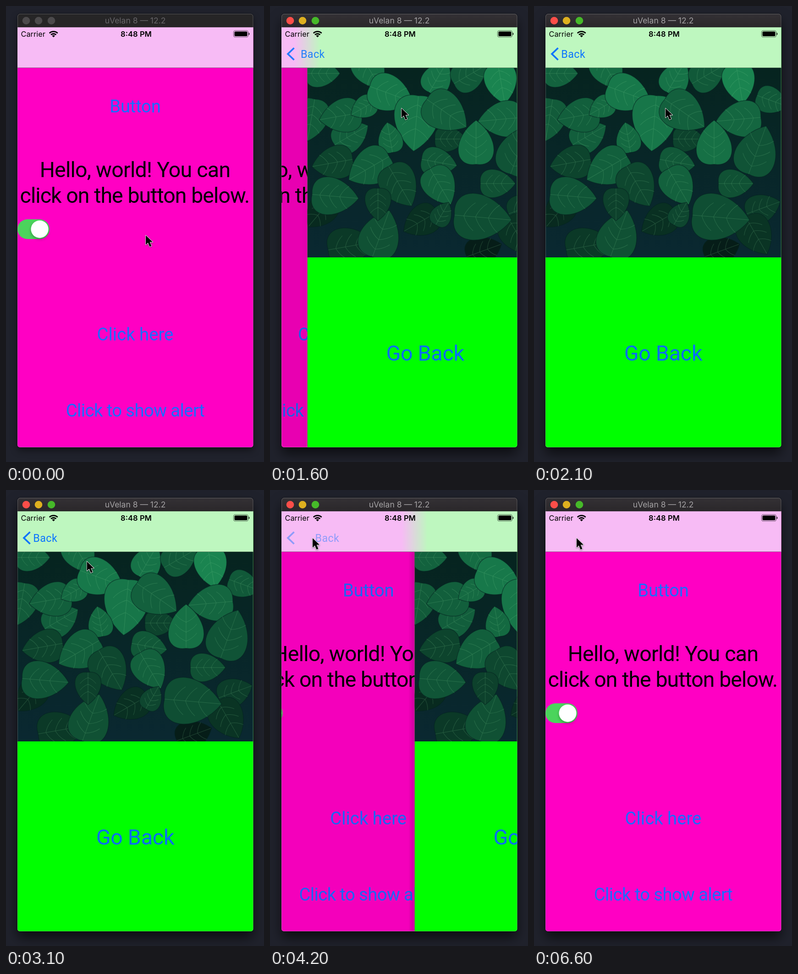
These frames come from a looping animation (563 px wide and 994 px high, 6.7 s). An HTML page:

```html
<!DOCTYPE html>
<html lang="en">
<head>
<meta charset="utf-8">
<title>Navigation demo</title>
<style>
  html, body { margin: 0; width: 100%; height: 100%; overflow: hidden; background: #20222c; }
  #shadow { position: absolute; left: 25px; top: 17px; width: 514px; height: 945px; border-radius: 6px; }
  svg { position: absolute; left: 0; top: 0; display: block; }
  text { font-family: Roboto, "Liberation Sans", sans-serif; }
  .ui { font-family: Inter, "Liberation Sans", sans-serif; font-optical-sizing: none; }
  .mid { text-anchor: middle; }
  .link { fill: #1a6bff; font-size: 38.3px; }
  .hello { font-size: 46.4px; }
</style>
</head>
<body>
<div id="shadow"></div>
<svg width="563" height="994" viewBox="0 0 563 994">
  <defs>
    <clipPath id="frame"><path d="M25 46H539.500V957a5 5 0 0 1-5 5H30a5 5 0 0 1-5-5Z"/></clipPath>
    <clipPath id="photoClip"><rect x="25" y="135" width="515" height="413"/></clipPath>
    <linearGradient id="bar" x2="0" y2="1">
      <stop stop-color="#343135"/><stop offset="1" stop-color="#2a272a"/>
    </linearGradient>
    <linearGradient id="navFill" gradientUnits="userSpaceOnUse" y1="0" y2="0">
      <stop stop-color="#f7bbf5"/><stop offset="1" stop-color="#bef7bf"/>
    </linearGradient>
    <linearGradient id="edgeFill">
      <stop stop-opacity="0"/><stop offset="1" stop-opacity=".5"/>
    </linearGradient>
    <linearGradient id="soil" x2="0" y2="1">
      <stop stop-color="#06241f"/><stop offset="1" stop-color="#0a2831"/>
    </linearGradient>
    <filter id="soft" x="-30%" y="-30%" width="160%" height="160%">
      <feDropShadow dx="0" dy="3" stdDeviation="3" flood-opacity=".3"/>
    </filter>
  </defs>

  <path id="titleBar" d="M25 46V23a6 6 0 0 1 6-6H533.500a6 6 0 0 1 6 6V46Z"/>
  <g id="lights"><circle cx="44" cy="32" r="8.300"/><circle cx="71" cy="32" r="8.300"/><circle cx="99" cy="32" r="8.300"/></g>
  <text id="title" class="ui mid" x="282" y="38.300" font-size="17.500">uVelan 8 — 12.2</text>

  <g clip-path="url(#frame)">
    <g id="home">
      <rect x="25" y="46" width="515" height="916" fill="#ff00c3"/>
      <text id="push" class="mid link" x="282" y="232" letter-spacing="-.2">Button</text>
      <text class="mid hello" x="281.500" y="372.500" letter-spacing="-.7">Hello, world! You can</text>
      <text class="mid hello" x="281" y="429" letter-spacing="-.9">click on the button below.</text>
      <rect x="25" y="465" width="70" height="43" rx="21.500" fill="#4bd45c"/>
      <circle cx="73.500" cy="486.500" r="19" fill="#fff" filter="url(#soft)"/>
      <text class="mid link" x="282" y="729">Click here</text>
      <text class="mid link" x="282" y="895" letter-spacing="-.6">Click to show alert</text>
    </g>
    <rect id="dim" x="25" y="46" width="515" height="916"/>
    <g id="detail">
      <rect id="edge" x="11" y="135" width="14" height="827" fill="url(#edgeFill)"/>
      <rect x="25" y="46" width="515" height="916" fill="#0f0"/>
      <g id="photo" clip-path="url(#photoClip)">
        <rect x="25" y="135" width="515" height="413" fill="url(#soil)"/>
      </g>
      <text class="mid" x="282" y="773" font-size="46.700" letter-spacing="-.3" fill="#0a6cff">Go Back</text>
    </g>

    <rect x="25" y="46" width="515" height="89" fill="url(#navFill)"/>
    <rect x="25" y="134" width="515" height="1" opacity=".4"/>
    <g id="back" fill="#0a74ff">
      <path d="M52.500 91.500L39 104.500L52.500 117.500" fill="none" stroke="#0a74ff" stroke-width="3.800"/>
      <text id="backText" y="112.700" font-size="23.300" letter-spacing=".4">Back</text>
    </g>

    <text class="ui" x="32.500" y="67" font-size="16.300">Carrier</text>
    <g fill="none" stroke="#000" stroke-width="2.900">
      <path d="M94.800 59.300a12.600 12.600 0 0 1 17.800 0M98.100 62.800a8 8 0 0 1 11.200 0"/>
    </g>
    <path d="M103.700 68.300l-3.200-3.400a4.600 4.600 0 0 1 6.400 0Z"/>
    <text class="ui mid" x="284" y="67" font-size="16.600" font-weight="600">8:48 PM</text>
    <rect x="496.500" y="53.500" width="32" height="14.500" rx="4" fill="none" stroke="#000" stroke-opacity=".55" stroke-width="1.200"/>
    <rect x="498.500" y="55.500" width="28" height="10.500" rx="2"/>
    <path d="M530 58.300a3.500 3.500 0 0 1 0 5Z" stroke="#000" stroke-opacity=".5"/>
  </g>
  <path d="M25 46H540" stroke="#111" stroke-opacity=".7"/>
  <rect x="25.500" y="17.500" width="513.500" height="944" rx="5.500" fill="none" stroke="#fff" stroke-opacity=".23"/>

  <path id="pointer" d="M0 0V20.500L4.800 16L8.600 24.800L12.500 23.100L8.700 14.600H15.200Z"
    stroke="#fff" stroke-width="1.600" stroke-linejoin="round" paint-order="stroke"
    style="filter:drop-shadow(0 1px 1.500px #0007)"/>
</svg>

<script>
const LOOP = 6700, WIDTH = 515;
const ACTIVATE = 800, PUSH = 1400, POP = 4100;
const PRESS_PUSH = [1300, 1500], PRESS_BACK = [3900, POP];
// time, x, y of the pointer tip
const POINTER = [[0, 305, 500], [200, 305, 500], [1000, 287, 223], [2500, 287, 223], [3600, 93, 105], [LOOP, 93, 105]];
const LIGHTS = ['#fc4e49', '#deb01f', '#46b929'];

// leaf centre x, y, length, tip angle
const LEAVES = [
  [28, 315, 82, 130], [33, 12, 76, 0], [137, 6, 90, 60], [285, 20, 80, -60], [355, 14, 85, -30],
  [495, 72, 74, 20], [8, 113, 95, 100], [95, 147, 86, -30], [312, 155, 70, 0], [55, 207, 92, 170],
  [475, 305, 80, -20], [95, 388, 105, -10], [385, 398, 82, -20], [247, 335, 86, 150], [460, 365, 95, 60],
  [423, 34, 90, 80], [72, 105, 94, 170], [122, 87, 62, 150], [182, 57, 102, 20], [237, 120, 124, 95],
  [303, 98, 108, 35], [422, 112, 100, 175], [180, 152, 68, -100], [368, 163, 98, -90], [462, 180, 114, -70],
  [287, 206, 80, 10], [135, 218, 104, 150], [290, 258, 92, 60], [202, 257, 102, 60], [415, 252, 78, 0],
  [60, 280, 104, 5], [160, 362, 110, -70], [154, 297, 72, 90], [294, 318, 58, -60], [382, 326, 128, 5]
];

const $ = id => document.getElementById(id);
const set = (id, attrs) => { for (const k in attrs) $(id).setAttribute(k, attrs[k]); };
const within = (t, [a, b]) => t >= a && t < b;

function addPath(parent, attrs) {
  const path = document.createElementNS('http://www.w3.org/2000/svg', 'path');
  for (const k in attrs) path.setAttribute(k, attrs[k]);
  parent.append(path);
}

function drawLeaf([x, y, len, angle], i) {
  const light = 1 - y / 800 + (i % 4 - 1.5) * 0.07 - (i < 15 ? 0.16 : 0);
  const rgb = [24, 124, 68].map((c, k) => Math.round(c * light + (k === 2 ? 8 : 0)));
  const at = (u, v) => `${(u * len).toFixed(1)} ${(v * len).toFixed(1)}`;
  const transform = `translate(${x + 25} ${y + 135}) rotate(${angle})`;
  addPath($('photo'), {
    transform, fill: `rgb(${rgb})`, stroke: '#04241f', 'stroke-opacity': 0.55, 'stroke-width': 1.5,
    d: `M${at(-0.48, 0)}C${at(-0.56, -0.52)} ${at(0.12, -0.54)} ${at(0.5, 0)}C${at(0.12, 0.54)} ${at(-0.56, 0.52)} ${at(-0.48, 0)}Z`
  });
  let veins = `M${at(-0.48, 0)}L${at(0.48, 0)}`;
  for (const u of [-0.32, -0.12, 0.1]) {
    for (const side of [-1, 1]) veins += `M${at(u, 0)}Q${at(u + 0.06, side * 0.15)} ${at(u + 0.18, side * 0.24)}`;
  }
  addPath($('photo'), { transform, d: veins, fill: 'none', stroke: '#7fd092', 'stroke-opacity': 0.22 });
}

function spring(ms) {
  if (ms <= 0) return 0;
  if (ms >= 550) return 1;
  const s = ms * 0.01875;
  return 1 - (1 + s) * Math.exp(-s);
}

function pointerAt(t) {
  const i = POINTER.findIndex(p => p[0] > t);
  const [t0, x0, y0] = POINTER[i - 1], [t1, x1, y1] = POINTER[i];
  const u = (t - t0) / (t1 - t0), e = u * u * (3 - 2 * u);
  return [x0 + (x1 - x0) * e, y0 + (y1 - y0) * e];
}

function drawWindow(active) {
  set('titleBar', { fill: active ? 'url(#bar)' : '#262526' });
  set('title', { fill: active ? '#a5a3a5' : '#68666a' });
  [...$('lights').children].forEach((c, i) => c.setAttribute('fill', active ? LIGHTS[i] : '#4c4a4c'));
  $('shadow').style.boxShadow = active
    ? '0 14px 26px rgba(0,0,0,.6), 0 0 2px #000'
    : '0 7px 16px rgba(0,0,0,.45), 0 0 2px #000';
}

function drawPages(t) {
  const p = t < POP ? spring(t - PUSH) : 1 - spring(t - POP);
  const x = WIDTH * (1 - p);
  const shown = t >= PUSH && t < POP + 550;
  const blur = Math.min(28, x, WIDTH - x);
  set('home', { transform: `translate(${-0.3 * WIDTH * p} 0)` });
  set('dim', { opacity: 0.1 * p });
  set('detail', { transform: `translate(${x} 0)`, visibility: shown ? 'visible' : 'hidden' });
  set('edge', { opacity: 0.6 * (1 - p) });
  set('navFill', { x1: 25 + x - blur - 0.01, x2: 25 + x + blur });
  set('push', { opacity: within(t, PRESS_PUSH) ? 0.24 : 1 });
  set('back', { opacity: within(t, PRESS_BACK) ? 0.24 : p });
  set('backText', { x: 59.3 + 0.135 * x });
}

function frame(now) {
  const t = (now - start) % LOOP;
  const [x, y] = pointerAt(t);
  drawWindow(t >= ACTIVATE);
  drawPages(t);
  set('pointer', { transform: `translate(${x} ${y})` });
}

LEAVES.forEach(drawLeaf);
const start = performance.now();
frame(start);
(function tick() {
  frame(performance.now());
  requestAnimationFrame(tick);
})();
</script>
</body>
</html>
```
